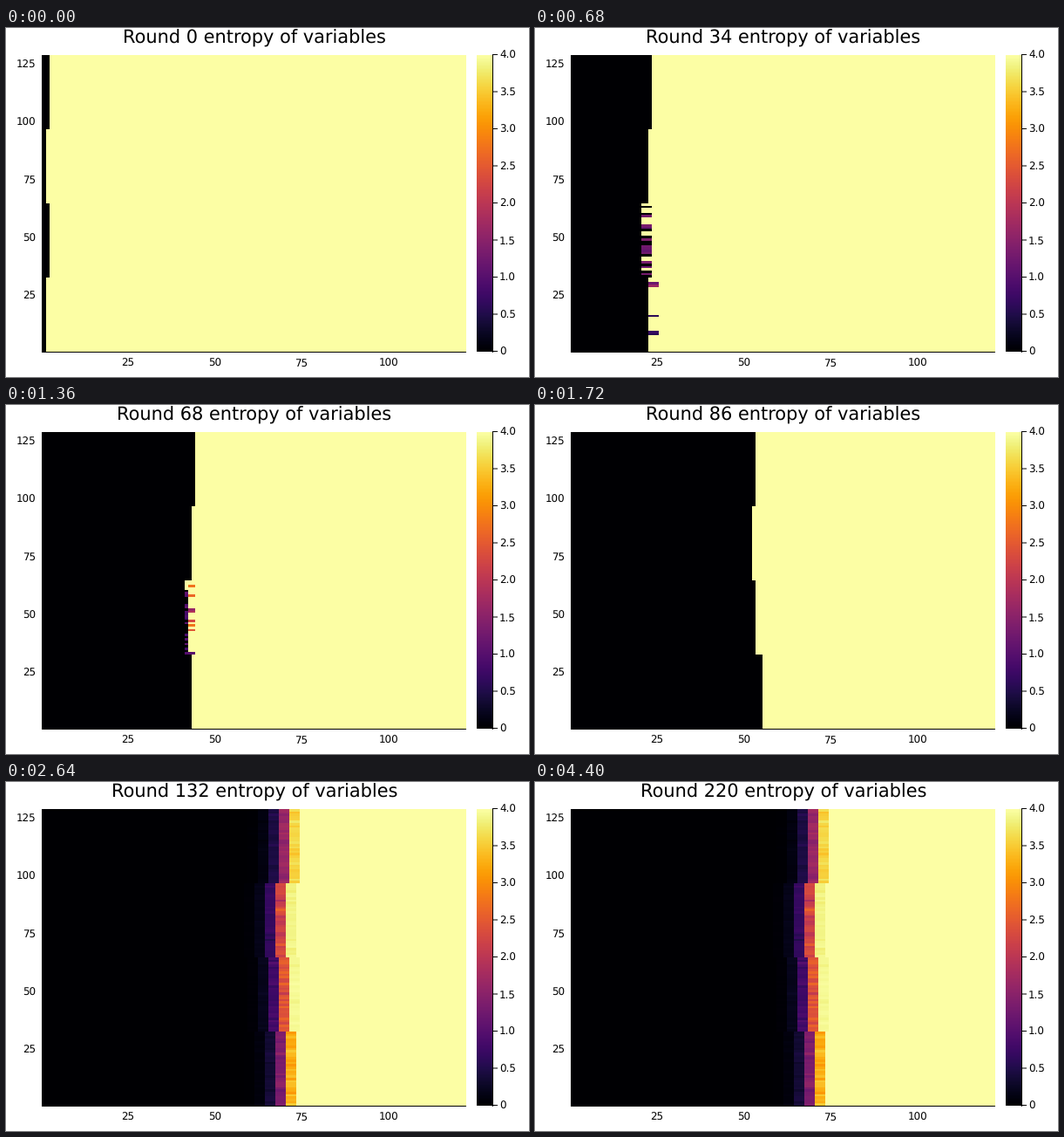
Write a matplotlib script that moves like this. It is 600 px wide and 400 px high and loops after 4420 ms.

```python
import numpy as np
import matplotlib.pyplot as plt
from matplotlib.animation import FuncAnimation

W, H, DPI = 600, 400, 100
FRAMES, INTERVAL = 221, 20
LEFT, RIGHT, TOP, BOTTOM = 42, 528, 31, 371
COLS, ROWS, WORD, MAX_H = 122, 128, 32, 4.0
LAST = 24  # last step at which any information arrives

# Four 32-row words, bottom to top: known columns at the start, phase of the
# five-round cycle in which each gains three columns, and fade-out step.
OFFSET = [1, 2, 1, 2]
PHASE = [4, 0, 2, 3]
FADE = [23.6, 23.05, 23.15, 23.45]


def settled_values():
    """Final entropies, indexed by word, step and row within the word."""
    noise = np.random.default_rng(7).normal(0, 0.09, (4, LAST + 1, WORD))
    steps = np.arange(LAST + 1)[None, :, None]
    fade = np.array(FADE)[:, None, None]
    return MAX_H * (1 - np.exp(-np.exp(1.45 * (steps - fade) + noise)))


FINAL = settled_values()


def scatter(rng, chance, low, high, rest):
    """Random rows between low and high, the others at rest."""
    return np.where(rng.random(WORD) < chance,
                    rng.uniform(low, high, WORD), rest)


def fill(grid, word, step, values, first=0, last=3):
    """Set the cells of a word that become known at a step."""
    start = OFFSET[word] + 3 * (step - 1)
    rows = slice(word * WORD, (word + 1) * WORD)
    values = np.maximum(values, FINAL[word, step])
    grid[rows, start + first:start + last] = values[:, None]


def add_partial(grid, n):
    """Rows that resolve before the rest of their word."""
    step, phase = n // 5 + 1, n % 5
    rng = np.random.default_rng([step, phase])
    if phase == 3 and step <= LAST:
        lead = scatter(rng, 0.5, 0.7, 1.1, 0)
        lead[-4:] = MAX_H
        fill(grid, 1, step, lead, last=1)
        fill(grid, 1, step, scatter(rng, 0.3, 1, 3, MAX_H), first=1)
    if phase == 4 and step <= LAST:
        known = scatter(rng, 0.5, 0, 0, MAX_H)
        fill(grid, 1, step, scatter(rng, 0.35, 1.1, 1.4, known))
        if step < LAST:
            fill(grid, 0, step + 1, scatter(rng, 0.12, 0.4, 2.2, MAX_H))


def entropy(n):
    grid = np.full((ROWS, COLS), MAX_H)
    for word in range(4):
        grid[word * WORD:(word + 1) * WORD, :OFFSET[word]] = 0
        for step in range(1, min((n + PHASE[word]) // 5, LAST) + 1):
            value = FINAL[word, step]
            if step > 21:
                age = n - (5 * step - PHASE[word])
                value = value + (MAX_H - value) * 0.2 * max(0, 1 - age / 14)
            fill(grid, word, step, value)
    add_partial(grid, n)
    return grid


plt.rcParams["font.family"] = "DejaVu Sans"
plt.rcParams["text.hinting"] = "none"
fig = plt.figure(figsize=(W / DPI, H / DPI), dpi=DPI, facecolor="white")
ax = fig.add_axes([0, 0, 1, 1])
ax.axis("off")


def label(x, y, text, size=8.55, ha="center"):
    return ax.text(x, y, text, fontsize=size, ha=ha, va="baseline",
                   color="black")


def line(xs, ys):
    ax.plot(xs, ys, color="black", lw=72 / DPI, solid_capstyle="butt",
            snap=False)


def image(data, x0, x1):
    return ax.imshow(data, cmap="inferno", vmin=0, vmax=MAX_H, origin="lower",
                     extent=(x0, x1, BOTTOM, TOP), aspect="auto",
                     interpolation="nearest")


# The small shift makes cell edges round to the right pixel.
heat = image(entropy(0), LEFT + 0.3, RIGHT + 0.3)
image(np.linspace(0, MAX_H, 256)[:, None], 540, 558)
ax.set_xlim(0, W)
ax.set_ylim(H, 0)

line([41.5, 41.5], [TOP, BOTTOM + 1])
line([41, RIGHT], [BOTTOM + 0.5] * 2)
for v in range(25, 126, 25):
    y = BOTTOM - (v - 0.5) * (BOTTOM - TOP) / ROWS
    label(34.5, y + 5.05, str(v), ha="right")
    if v < COLS:
        x = LEFT + (v - 0.5) * (RIGHT - LEFT) / COLS
        label(x + 0.3, 388, str(v))

line([558.5, 558.5], [TOP - 1, BOTTOM + 1])
for i in range(9):
    y = BOTTOM - i * (BOTTOM - TOP) / 8
    line([558, 564], [y - 0.5] * 2)
    label(566, y + 4, f"{i / 2:.1f}" if i else "0", ha="left")

title = label((LEFT + RIGHT) / 2, 18, "", size=15)


def update(n):
    heat.set_data(entropy(n))
    title.set_text(f"Round {n} entropy of variables")
    return heat, title


anim = FuncAnimation(fig, update, frames=FRAMES, interval=INTERVAL,
                     repeat=True, repeat_delay=0, blit=False)
plt.show()
```
